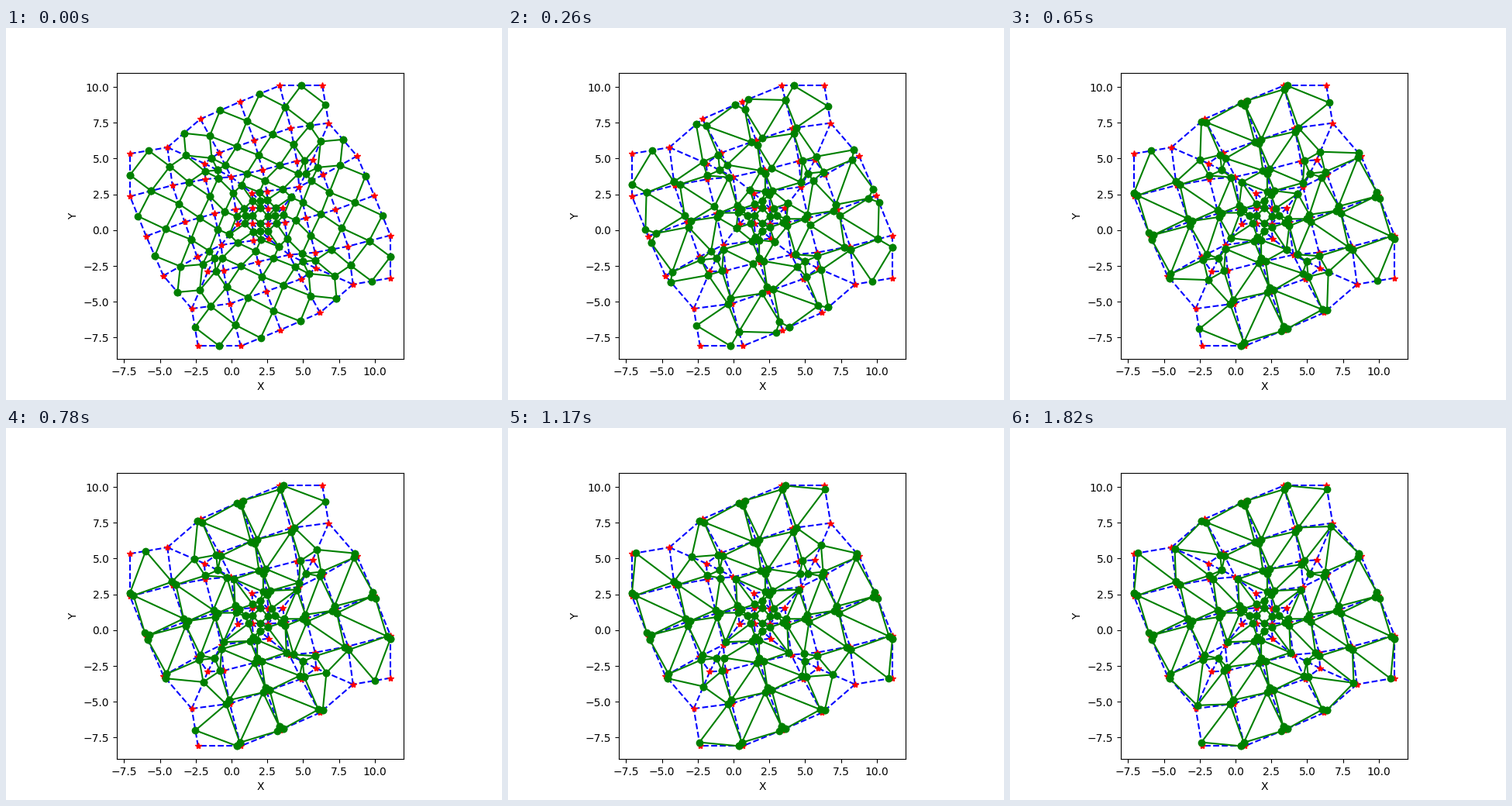
A matplotlib script for the animation above (2.99 s loop, 640 px wide and 480 px high).

```python
import numpy as np
import matplotlib.pyplot as plt
from matplotlib.animation import FuncAnimation

CENTER = 2 + 1j
MIN_GAP = 0.25          # closest a bead may get to the end of its edge
STEPS = [0, 1, 3, 6, 9, 11, 14]

# One quarter of the mesh, relative to the centre; the rest follows by rotation.
VERTS = {
    "A": 1.36 + 9.09j, "B": 4.34 + 9.09j, "C": 4.78 + 6.48j,
    "D": 6.76 + 4.18j, "E": 7.96 + 1.42j, "F": 2.13 + 6.13j,
    "G": -0.43 + 5.27j, "H": 4.40 + 2.87j, "I": 3.66 + 3.90j,
    "J": 2.56 + 3.83j, "K": 0.16 + 3.21j, "L": 2.72 + 2.03j,
    "M": 0.46 + 1.72j, "N": 1.58 + 0.57j, "O": 0.56 + 0.52j,
}

# Bead position along each edge at STEPS; "+" and "-" mean the next quarter
# counter-clockwise or clockwise. Values are clipped by MIN_GAP.
TRACKS = {
    "A B": [.5, .39, .175, -.15],
    "B C": [.5, .57, .525, .42, .1],
    "C D": [.5, .755, .87, .93],
    "D E": [.5, .665, 1],
    "E A-": [.5, .34, 0],
    "A F": [.5, .525, .155, -.2],
    "C F": [.5, .83, 1],
    "F G": [.5, .66, 1],
    "G E+": [.5, .64, .95],
    "F J": [.5, .33, 0],
    "J I": [.5, .2, 0],
    "C I": [.5, .925, .89, .72, .6, .515, .09],
    "H I": [.5, .18, 0],
    "D H": [.5, .41, 0],
    "H L": [.5, .555, .44, .12],
    "I L": [.5],
    "J L": [.5, .8, .862, .84, .5, .12],
    "J K": [.5, .64, .95],
    "G K": [.5, .3, 0],
    "H G-": [.5, .71, 1],
    "L K-": [.5, .88, 1],
    "K M": [.5, .2, 0],
    "L M": [.5, .9, 1],
    "L N": [.5, .85, .75, .12],
    "N O": [.5, .8, 1],
    "M O": [.5, .2, 0],
    "M N+": [.5, .23, 0],
    "N+ O": [.5],
    "O O+": [.5],
}

FACES = ["A B C F", "A F G E+", "F C I J", "C D H I", "I H L", "I L J",
         "F J K G", "J L M K", "L N O M", "D+ E+ G H+", "H+ G K L+",
         "K M N+ L+", "M O N+", "N+ O O+"]
HUB = "O O+ O++ O-"


def nodes(names, turn):
    return [(n[0], (turn + n.count("+") - n.count("-")) % 4)
            for n in names.split()]


def place(node):
    name, turn = node
    return CENTER + VERTS[name] * 1j ** turn


edges = {}
for names, track in TRACKS.items():
    for turn in range(4):
        a, b = nodes(names, turn)
        edges[frozenset((a, b))] = (place(a), place(b), track)


def face_edges(names, turn):
    ring = nodes(names, turn)
    return [frozenset(pair) for pair in zip(ring, ring[1:] + ring[:1])]


loops = [face_edges(names, turn) for names in FACES for turn in range(4)]
loops.append(face_edges(HUB, 0))


def bead(edge, step):
    a, b, track = edges[edge]
    gap = MIN_GAP / abs(b - a)
    t = np.interp(step, STEPS[:len(track)], track)
    return a + np.clip(t, gap, 1 - gap) * (b - a)


fig, ax = plt.subplots(figsize=(6.4, 4.8), dpi=100)
ax.set_aspect("equal")
ax.set(xlim=(-8, 12), ylim=(-9, 11), xlabel="X", ylabel="Y")

for a, b, _ in edges.values():
    ax.plot([a.real, b.real], [a.imag, b.imag], "b--")
stars = np.array([place((name, turn)) for name in VERTS for turn in range(4)])
ax.plot(stars.real, stars.imag, "r*")
rings = [ax.plot([], [], "go-")[0] for _ in loops]


def update(step):
    beads = {edge: bead(edge, step) for edge in edges}
    for ring, loop in zip(rings, loops):
        pts = np.array([beads[edge] for edge in loop + loop[:1]])
        ring.set_data(pts.real, pts.imag)
    return rings


anim = FuncAnimation(fig, update, frames=23, interval=130, repeat=True,
                     repeat_delay=0, blit=False)
plt.show()
```
